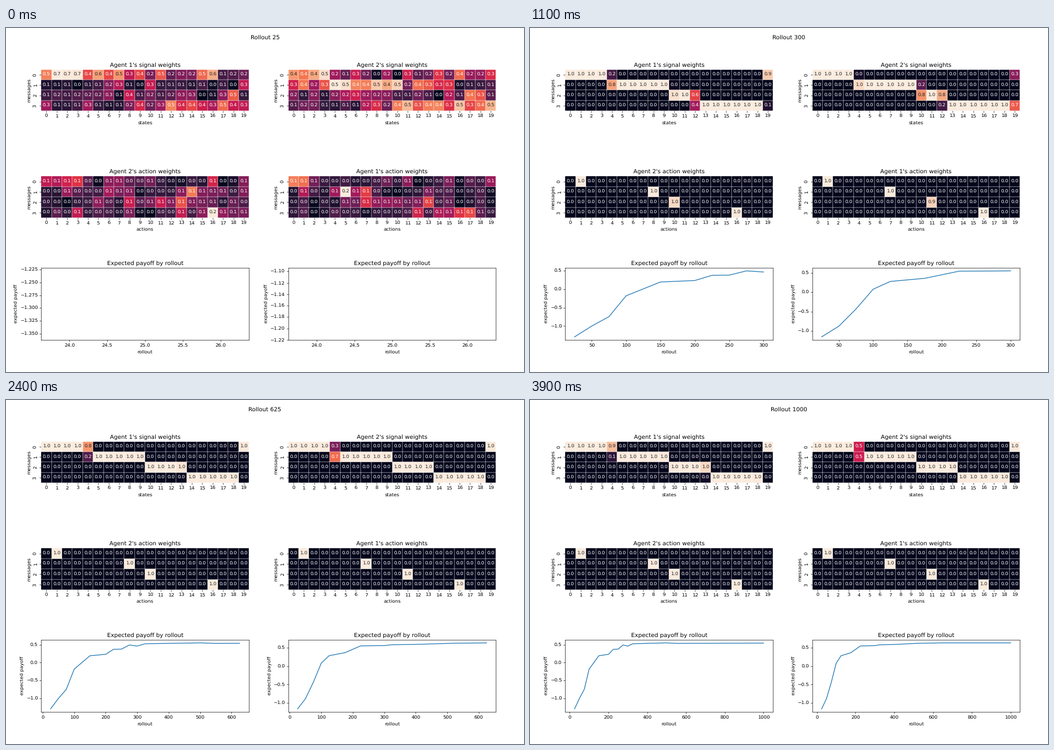
A matplotlib script that plays this animation: 917 by 611 pixels, repeating every 4 s.

```python
import numpy as np
import matplotlib.pyplot as plt
from matplotlib.animation import FuncAnimation
from matplotlib.colors import LinearSegmentedColormap

W, H = 917, 611
DPI = W / 15
FRAMES, STEP = 40, 25
STATES, MESSAGES = 20, 4

plt.rcParams.update({"font.family": "DejaVu Sans", "font.size": 10,
                     "text.hinting": "none"})

ROCKET = LinearSegmentedColormap.from_list("rocket", [
    (0, "#03051a"), (1 / 7, "#35193e"), (2 / 7, "#701f57"), (0.4, "#a11a5b"),
    (0.5, "#cb1b4f"), (4 / 7, "#e13342"), (5 / 7, "#f37651"),
    (0.8, "#f69c73"), (6 / 7, "#f6b48f"), (1, "#faebdd")])

rng = np.random.default_rng(25)
rollouts = STEP * np.arange(1, FRAMES + 1)
KEYS = (0, 3, 7, 16, 24, 39)


def tracked(tracks, frame):
    """Value of each track, which is given at the KEYS frames."""
    return np.array([np.interp(frame, KEYS, track) for track in tracks])


def sigmoid(x):
    return (1 + np.tanh(x / 2)) / 2


def signal_rule(*cuts):
    """Messages own bands of states; the soft cuts between them sharpen."""
    noise = rng.dirichlet(np.full(MESSAGES, 1.5), STATES).T

    def weights(frame):
        width = 0.1 + 1.6 * np.exp(-frame / 1.8)
        offsets = np.arange(STATES) - tracked(cuts, frame)[:, None]
        steps = sigmoid(offsets / width)
        bands = np.vstack([1 - steps[0] + steps[3], steps[:-1] - steps[1:]])
        mix = 0.65 * np.exp(-frame / 1.3)
        return np.abs((1 - mix) * bands + mix * noise)

    return weights


def action_rule(*centers):
    """Each message's weights gather in a narrowing bump round one action."""
    noise = rng.dirichlet(np.full(STATES, 1.5), MESSAGES)
    settle = np.array([[1.5], [1.5], [4], [1.5]])  # message 2 is slowest

    def weights(frame):
        width = 0.2 + 1.1 * np.exp(-frame / 3)
        offsets = np.arange(STATES) - tracked(centers, frame)[:, None]
        bumps = np.exp(-(offsets / width) ** 2 / 2)
        bumps /= bumps.sum(axis=1, keepdims=True)
        mix = 0.78 * np.exp(-frame / settle)
        return (1 - mix) * bumps + mix * noise

    return weights


signal1 = signal_rule((9.5, 4.0, 3.6, 4.15, 4.13, 4.2),
                      (9.5, 10.3, 9.75, 9.5, 9.5, 9.5),
                      (9.5, 10.3, 11.1, 13.22, 13.4, 13.3),
                      (19.5, 19.2, 18.95, 18.5, 18.5, 18.5))
signal2 = signal_rule((3, 4.5, 3.6, 3.79, 3.92, 4),
                      (10, 11.2, 10.17, 9.5, 9.5, 9.5),
                      (10, 11.2, 11.9, 12.5, 13.5, 13.5),
                      (18.5, 19.3, 19.2, 18.9, 18.5, 18.5))
action2 = action_rule((1, 1, 1, 1, 1, 1),
                      (14, 7.2, 7.6, 8, 8, 8),
                      (13, 13, 10.3, 10, 10, 10),
                      (16, 18.2, 16.45, 16, 16, 16))
action1 = action_rule((0, 0.7, 1, 1, 1, 1),
                      (6, 7, 7, 7, 7, 7),
                      (10, 10.9, 10.47, 11, 11, 11),
                      (15.5, 16.2, 16, 16, 16, 16))


def curve(*points):
    return np.interp(rollouts, *zip(*points))


payoff_left = curve(
    (25, -1.292), (50, -1.0), (75, -0.747), (100, -0.183), (150, 0.19),
    (200, 0.23), (225, 0.37), (250, 0.375), (275, 0.49), (300, 0.46),
    (325, 0.525), (500, 0.549), (550, 0.535), (1000, 0.543))
payoff_right = curve(
    (25, -1.157), (50, -0.881), (75, -0.435), (100, 0.078), (125, 0.28),
    (175, 0.36), (225, 0.545), (300, 0.553), (325, 0.576), (400, 0.585),
    (525, 0.617), (650, 0.628), (1000, 0.628))


def text_color(rgb):
    linear = np.where(rgb <= 0.03928, rgb / 12.92,
                      ((rgb + 0.055) / 1.055) ** 2.4)
    return "0.15" if linear @ [0.2126, 0.7152, 0.0722] > 0.408 else "white"


# A hair over the pixel size guards against truncation
fig = plt.figure(figsize=((W + 1e-6) / DPI, (H + 1e-6) / DPI), dpi=DPI,
                 facecolor="white")
heading = fig.suptitle("")

LEFT, RIGHT, WIDTH = 62.2, 499.55, 367.9
CELL = WIDTH / STATES


def panel(x, y, height, title, xlabel, ylabel):
    ax = fig.add_axes([x / W, 1 - (y + height) / H, WIDTH / W, height / H])
    ax.set(title=title, xlabel=xlabel, ylabel=ylabel)
    return ax


class Heatmap:
    def __init__(self, x, y, title, xlabel, weights):
        self.weights = weights
        ax = panel(x, y, MESSAGES * CELL, title, xlabel, "messages")
        self.mesh = ax.pcolormesh(np.zeros((MESSAGES, STATES)), cmap=ROCKET,
                                  edgecolor="white", linewidth=0.45,
                                  antialiased=True)
        ax.set(xlim=(0, STATES), ylim=(MESSAGES, 0))
        ax.set_xticks(np.arange(STATES) + 0.5, labels=range(STATES))
        ax.set_yticks(np.arange(MESSAGES) + 0.5, labels=range(MESSAGES),
                      rotation=90, va="center")
        ax.spines[:].set_visible(False)
        self.labels = [ax.text(c + 0.5, r + 0.5, "", ha="center", va="center")
                       for r in range(MESSAGES) for c in range(STATES)]

    def show(self, frame):
        cells = self.weights(frame)
        self.mesh.set_array(cells)
        self.mesh.set_clim(cells.min(), cells.max())
        colors = self.mesh.to_rgba(cells.ravel())[:, :3]
        for label, value, rgb in zip(self.labels, cells.flat, colors):
            label.set_text(f"{value:.1f}")
            label.set_color(text_color(rgb))


class Payoff:
    def __init__(self, x, values):
        self.values = values
        self.ax = panel(x, 425.55, 128.9, "Expected payoff by rollout",
                        "rollout", "expected payoff")
        self.line, = self.ax.plot([], [])

    def show(self, frame):
        n = frame + 1
        self.line.set_data(rollouts[:n], self.values[:n])
        self.ax.relim()
        self.ax.autoscale_view()


panels = [
    Heatmap(LEFT, 73.7, "Agent 1's signal weights", "states", signal1),
    Heatmap(RIGHT, 73.7, "Agent 2's signal weights", "states", signal2),
    Heatmap(LEFT, 263.5, "Agent 2's action weights", "actions", action2),
    Heatmap(RIGHT, 263.5, "Agent 1's action weights", "actions", action1),
    Payoff(LEFT, payoff_left),
    Payoff(RIGHT, payoff_right),
]


def update(frame):
    heading.set_text(f"Rollout {rollouts[frame]}")
    for part in panels:
        part.show(frame)
    return []


anim = FuncAnimation(fig, update, frames=FRAMES, interval=100, repeat=True,
                     repeat_delay=0, blit=False)
plt.show()
```
